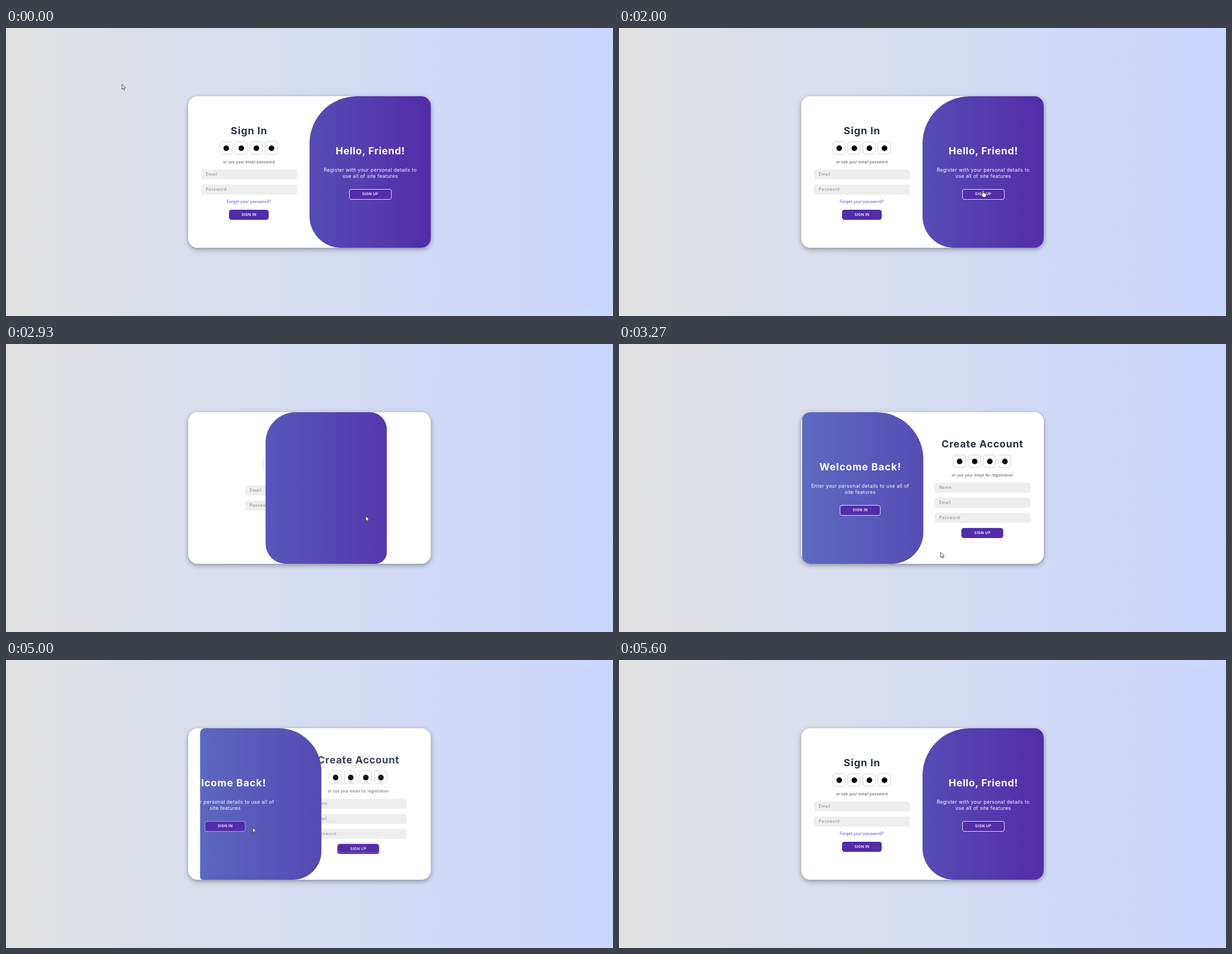
An HTML page for the animation above (6.34 s loop, 1086 by 515 pixels).

```html
<!DOCTYPE html>
<html lang="en">
<head>
<meta charset="utf-8">
<title>Sign in</title>
<style>
html, body { margin: 0; width: 100%; height: 100%; overflow: hidden; }
body {
  position: relative;
  background: linear-gradient(to right, #e2e2e2, #c9d6ff);
  font-family: Inter, "Open Sans", sans-serif;
}
.card, .card div, .card i, .cursor, .cursor svg { position: absolute; box-sizing: border-box; }
.card {
  left: 326px; top: 122px; width: 434px; height: 271px;
  background: #fff; border-radius: 17px; overflow: hidden;
  box-shadow: 0 2.8px 8.5px rgba(0, 0, 0, .35);
}
.form, .half { left: 0; top: 0; width: 217px; height: 271px; }
.form { background: #fff; }
.in { z-index: 2; }
.up { z-index: 1; opacity: 0; }

.line {
  left: 0; width: 217px; top: calc(var(--y) * 1px - 8px); line-height: 16px;
  text-align: center; white-space: nowrap;
  letter-spacing: var(--ls); text-indent: var(--ls);
}
.title { font-size: 17.8px; font-weight: 700; color: #263040; }
.note { --ls: .2px; font-size: 6.7px; color: #4a4a52; }
.link { --ls: .17px; font-size: 6.9px; font-weight: 500; color: #5b5ff2; }
.field {
  left: 22.5px; width: 172px; height: 18px; top: calc(var(--y) * 1px); padding-left: 9px;
  background: #eee; border-radius: 4.5px; color: #808080;
  font-size: 7.2px; line-height: 18px; letter-spacing: .5px;
}
.btn {
  left: calc(108.5px - var(--w) / 2); width: var(--w); top: calc(var(--y) * 1px);
  height: 18px; line-height: 18px; border-radius: 4.5px;
  background: #512da8; color: #fff; text-align: center;
  font-size: 6.5px; font-weight: 600; letter-spacing: .4px; text-indent: .4px;
}
.half .btn { height: 18.5px; line-height: 16.5px; border: 1px solid rgba(255, 255, 255, .85); }
.icons { left: 56.3px; top: calc(var(--y) * 1px); }
.icons i { width: 23px; height: 23px; top: 0; border: 1px solid #d2d2d2; border-radius: 20%; }
.icons i:nth-child(2) { left: 27px; }
.icons i:nth-child(3) { left: 54px; }
.icons i:nth-child(4) { left: 81px; }
.icons i::after {
  content: ""; position: absolute; left: 5.5px; top: 5.5px;
  width: 10px; height: 10px; border-radius: 50%; background: #000;
}

.toggle {
  left: 217px; top: 0; width: 217px; height: 271px; z-index: 10; overflow: hidden;
  border-radius: 84.75px 0 0 56.5px;
}
.fill {
  left: -217px; top: 0; width: 434px; height: 271px; color: #fff;
  background: linear-gradient(to right, #5c6bc0, #512da8);
}
.half .title { color: #fff; }
.half .text { --ls: .38px; font-size: 8.7px; }
.welcome { transform: translateX(-434px); }
.half.hello { left: 217px; }

.cursor { left: 0; top: 0; z-index: 20; }
.cursor svg { left: 0; top: 0; overflow: visible; fill: #fff; stroke: #222; stroke-width: .8; stroke-linejoin: round; }
.hand { opacity: 0; }
</style>
</head>
<body>
<div class="card">
  <div class="form up">
    <div class="line title" style="--y:56.5;--ls:.78px">Create Account</div>
    <div class="icons" style="--y:76.3"><i></i><i></i><i></i><i></i></div>
    <div class="line note" style="--y:112.5">or use your email for registration</div>
    <div class="field" style="--y:125.7">Name</div>
    <div class="field" style="--y:152.9">Email</div>
    <div class="field" style="--y:180">Password</div>
    <div class="btn" style="--y:207.4;--w:75px">SIGN UP</div>
  </div>
  <div class="form in">
    <div class="line title" style="--y:61.5;--ls:.95px">Sign In</div>
    <div class="icons" style="--y:81.4"><i></i><i></i><i></i><i></i></div>
    <div class="line note" style="--y:117.5">or use your email password</div>
    <div class="field" style="--y:130.7">Email</div>
    <div class="field" style="--y:157.9">Password</div>
    <div class="line link" style="--y:189">Forget your password?</div>
    <div class="btn" style="--y:202.8;--w:71px">SIGN IN</div>
  </div>
  <div class="toggle">
    <div class="fill">
      <div class="half welcome">
        <div class="line title" style="--y:97.5;--ls:.95px">Welcome Back!</div>
        <div class="line text" style="--y:132">Enter your personal details to use all of</div>
        <div class="line text" style="--y:143.2">site features</div>
        <div class="btn" style="--y:166.4;--w:73px">SIGN IN</div>
      </div>
      <div class="half hello">
        <div class="line title" style="--y:97.5;--ls:.65px">Hello, Friend!</div>
        <div class="line text" style="--y:132">Register with your personal details to</div>
        <div class="line text" style="--y:143.2">use all of site features</div>
        <div class="btn" style="--y:166.4;--w:76px">SIGN UP</div>
      </div>
    </div>
  </div>
</div>
<div class="cursor">
  <svg class="arrow" width="8" height="12"><path d="M.5 .5V9.6L2.6 7.7L4 11L5.5 10.4L4.1 7.2H7Z"/></svg>
  <svg class="hand" width="10" height="14"><path d="M0 .5Q1 .5 1 1.5V5L4.6 5.8Q6 6.2 6 7.4L5.4 10.6L4.6 12.8H.6L-2.3 9Q-3 7.9 -2.2 7.5T-1 8.2V1.5Q-1 .5 0 .5Z"/></svg>
</div>
<script>
const LOOP = 6340, TICKS = 95, TICK = LOOP / TICKS;
const OPEN = [2668, 3309], CLOSE = [4875, 5471];
const $ = s => document.querySelector(s);

// keys: [ms, properties, easing to the next key]; the whole loop advances in 15 fps ticks
function play(sel, keys) {
  const last = keys[keys.length - 1];
  const frames = [[0, keys[0][1]], ...keys, [LOOP, last[1]]].map(([ms, props, easing = 'linear']) =>
    ({ offset: ms / LOOP, easing, ...props }));
  $(sel).animate(frames, { duration: LOOP, iterations: Infinity, delay: -7, easing: `steps(${TICKS})` });
}

// shut -> open -> shut
function swap(sel, shut, open) {
  play(sel, [
    [OPEN[0], shut, 'ease-in-out'], [OPEN[1], open],
    [CLOSE[0], open, 'ease-in-out'], [CLOSE[1], shut]
  ]);
}
const shift = x => ({ transform: `translateX(${x}px)` });

swap('.in', shift(0), shift(217));
swap('.up', shift(0), shift(217));
swap('.fill', shift(0), shift(217));
swap('.welcome', shift(-434), shift(0));
swap('.hello', shift(0), shift(434));
swap('.toggle',
  { ...shift(0), borderRadius: '84.75px 0 0 56.5px' },
  { ...shift(-217), borderRadius: '0 84.75px 56.5px 0' });

const back = { opacity: 0, zIndex: 1 }, front = { opacity: 1, zIndex: 5 };
play('.up', [
  [(OPEN[0] + OPEN[1]) / 2, back, 'step-end'], [(OPEN[0] + OPEN[1]) / 2 + 1, front],
  [CLOSE[0], front, 'ease-in-out'], [CLOSE[1], back]
]);

// button outlines on hover
const white = { borderColor: 'rgba(255,255,255,.85)' }, blue = { borderColor: '#5c6cf0' };
const glow = (sel, a, b, c, d) => play(sel, [a, b, c, d].map((t, i) => [t * TICK, i % 3 ? blue : white]));
glow('.hello .btn', 30, 34, 40, 44);
glow('.welcome .btn', 63, 67, 72, 78);

// pointer path: [tick, x, y, easing]
play('.cursor', [
  [7, 207, 100, 'cubic-bezier(.5,.1,.75,.6)'],
  [17, 282, 186, 'cubic-bezier(.35,.15,.6,.9)'],
  [27, 635, 278, 'ease-out'],
  [30, 651, 290, 'ease-out'],
  [34, 650, 297],
  [39, 650, 297, 'ease-in'],
  [44, 643, 307, 'cubic-bezier(.4,.2,.7,.8)'],
  [49, 575, 372, 'cubic-bezier(.3,.4,.7,.9)'],
  [59, 452, 326, 'ease-out'],
  [67, 440, 296],
  [71, 440, 296],
  [78, 441, 301, 'ease-in'],
  [81, 385, 396],
  [82, 290, 445],
  [83, 163, 503]
].map(([k, x, y, e]) => [k * TICK, { transform: `translate(${x}px,${y}px)` }, e]));

const show = { opacity: 1 }, hide = { opacity: 0 };
const flips = (sel, first, ticks) => play(sel, [0, ...ticks].map((k, i) =>
  [Math.max(0, k - .3) * TICK, (i % 2 === 0) === first ? show : hide, 'step-end']));
flips('.arrow', true, [28, 42, 62, 74]);
flips('.hand', false, [28, 42, 62, 74]);
flips('.cursor', true, [84]);
</script>
</body>
</html>
```
